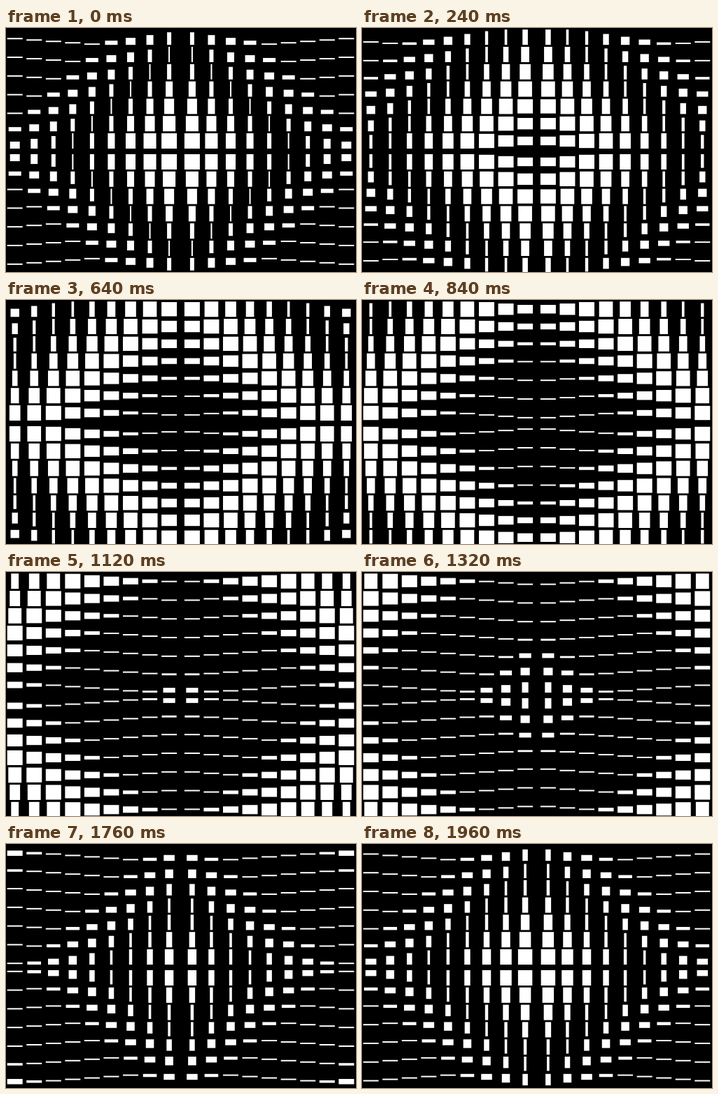
Write an HTML page that moves like this. It is 500 px wide and 350 px high and loops after 2 s.

```html
<!DOCTYPE html>
<html lang="en">
<head>
<meta charset="utf-8">
<title>Morphing grid</title>
<style>
  html, body {
    margin: 0;
    width: 100%;
    height: 100%;
    overflow: hidden;
    background: #000;
  }
  svg { display: block; }
  rect {
    fill: #fff;
    animation: morph 2s linear infinite;
  }
  /* square, centred bar, bar at the inner edge, upright bar, square */
  @keyframes morph {
    0%, 100% { x: -11px; y: 0px;  width: 22px; height: 22px; }
    25%      { x: -11px; y: 10px; width: 22px; height: 2px; }
    50%      { x: -11px; y: 0px;  width: 22px; height: 2px; }
    75%      { x: -1px;  y: 0px;  width: 2px;  height: 22px; }
  }
</style>
</head>
<body>
<svg id="stage" width="500" height="350" viewBox="0 0 500 350"></svg>
<script>
  const COLS = 9, ROWS = 7;
  const LOOP = 2000, LAG = 100;
  const CENTER = { x: 249.5, y: 177 };
  const INNER = { x: 16.4, y: 4 };
  const PITCH = { x: 27.55, y: 24.8 };

  function add(parent, name, transform) {
    const node = document.createElementNS("http://www.w3.org/2000/svg", name);
    node.setAttribute("transform", transform);
    return parent.appendChild(node);
  }

  // Each quadrant mirrors the same grid, with cells lagging outwards.
  function addQuadrant(sx, sy) {
    const group = add(document.getElementById("stage"), "g",
      `translate(${CENTER.x} ${CENTER.y}) scale(${sx} ${sy})`);
    for (let row = 0; row < ROWS; row++) {
      for (let col = 0; col < COLS; col++) {
        const x = INNER.x + col * PITCH.x;
        const y = INNER.y + row * PITCH.y;
        const cell = add(group, "rect", `translate(${x} ${y})`);
        cell.style.animationDelay = `${(col + row) * LAG - LOOP}ms`;
      }
    }
  }

  for (const sx of [-1, 1]) {
    for (const sy of [-1, 1]) addQuadrant(sx, sy);
  }
</script>
</body>
</html>
```
